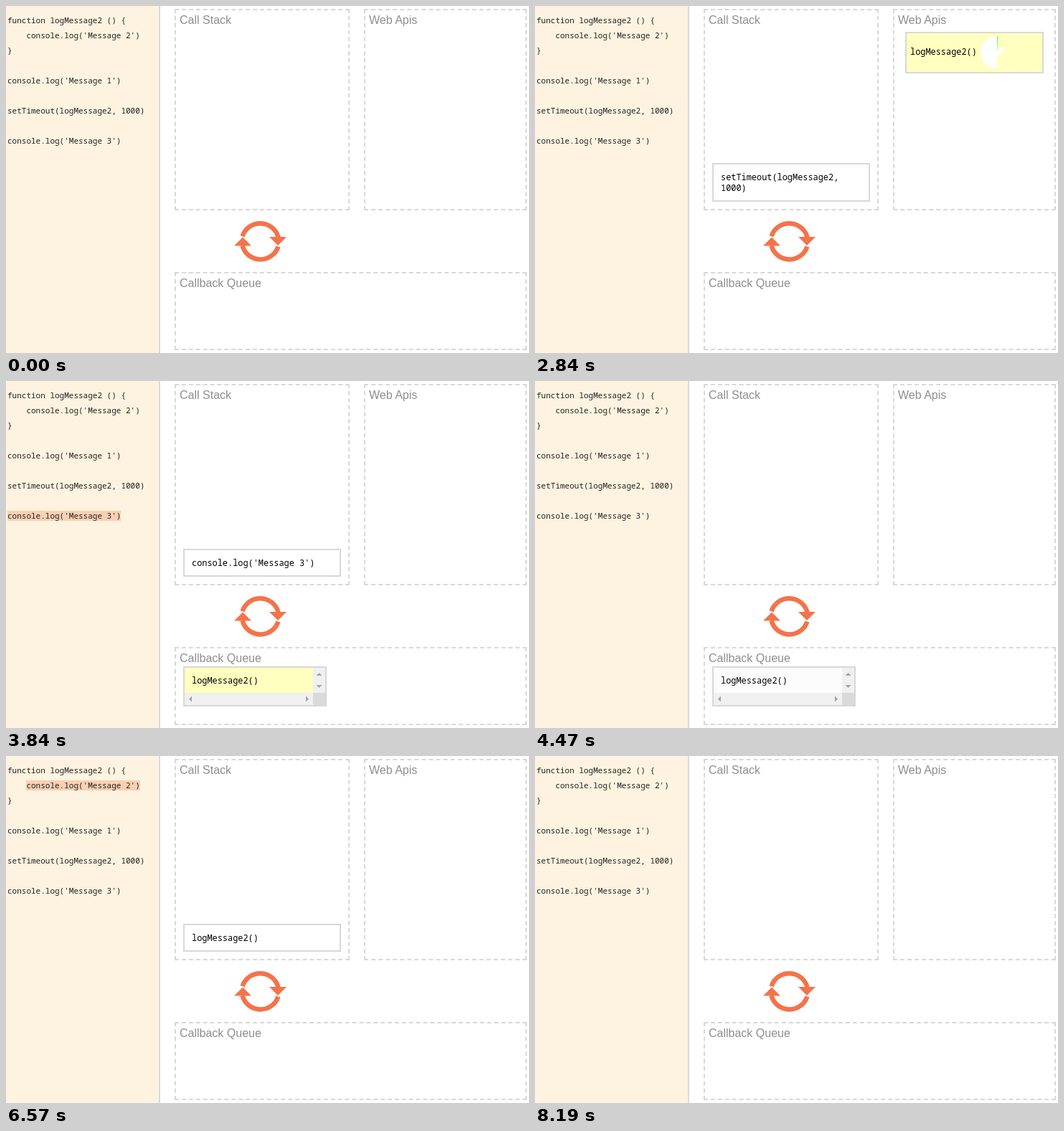
These frames come from a looping animation (729 px wide and 484 px high, 9.51 s). An HTML page:

```html
<!DOCTYPE html>
<html lang="en">
<head>
<meta charset="utf-8">
<title>Event loop</title>
<style>
  html, body { margin: 0; width: 100%; height: 100%; overflow: hidden; background: #fff; }
  .code { position: absolute; left: 0; top: 0; width: 213px; height: 484px; background: #fdf3e0; border-right: 2px solid #dbdbd6; }
  .panel { position: absolute; box-sizing: border-box; border: 2px dashed #d8d8d8; }
  svg { position: absolute; left: 0; top: 0; }
  text { white-space: pre; font-family: "Noto Sans Mono", "Liberation Mono", monospace; }
  .src text { font-size: 11px; fill: #222; }
  .item text { font-size: 11.91px; fill: #000; }
  .label text { font: 16px "Liberation Sans", Arial, sans-serif; fill: #8e8e8e; }
  .mark rect { fill: #f9d0b3; }
  .frame { fill: #fff; stroke: #d8d8d8; stroke-width: 2; }
  .track { fill: #f0f0f0; }
  .arrow { fill: #a2a2a2; }
  .mark rect, .item { opacity: 0; }
</style>
</head>
<body>
<div class="code"></div>
<div class="panel" style="left:235px;top:4px;width:244px;height:281px"></div>
<div class="panel" style="left:499px;top:4px;width:227px;height:281px"></div>
<div class="panel" style="left:235px;top:371px;width:491px;height:109px"></div>

<svg width="729" height="484" viewBox="0 0 729 484">
  <g class="mark">
    <rect id="mark1" x="2" y="97" width="158" height="14"/>
    <rect id="markTimer" x="2" y="139" width="191" height="14"/>
    <rect id="mark3" x="2" y="181" width="158" height="14"/>
    <rect id="mark2" x="28" y="34" width="159" height="14"/>
  </g>
  <g class="src">
    <text x="2" y="24">function logMessage2 () {</text>
    <text x="28.4" y="45">console.log('Message 2')</text>
    <text x="2" y="66">}</text>
    <text x="2" y="108">console.log('Message 1')</text>
    <text x="2" y="150">setTimeout(logMessage2, 1000)</text>
    <text x="2" y="192">console.log('Message 3')</text>
  </g>
  <g class="label">
    <text x="242" y="25">Call Stack</text>
    <text x="506" y="25">Web Apis</text>
    <text x="242" y="392">Callback Queue</text>
  </g>

  <g id="loop" fill="#f4734a">
    <g id="half">
      <path d="M329.6 321.2A26 26 0 0 1 379.5 322.5" fill="none" stroke="#f4734a" stroke-width="6.5"/>
      <path d="M367 322h24l-12 12z"/>
    </g>
    <use href="#half" transform="rotate(180 354.5 328.3)"/>
  </g>

  <g class="item" id="log1">
    <rect class="frame" x="248" y="235" width="218" height="37"/>
    <text x="259" y="258">console.log('Message 1')</text>
  </g>
  <g class="item" id="timeout">
    <rect class="frame" x="248" y="220" width="218" height="52"/>
    <text x="259" y="243">setTimeout(logMessage2,</text>
    <text x="259" y="258">1000)</text>
  </g>
  <g class="item" id="log3">
    <rect class="frame" x="248" y="235" width="218" height="37"/>
    <text x="259" y="258">console.log('Message 3')</text>
  </g>
  <g class="item" id="call2">
    <rect class="frame" x="248" y="235" width="218" height="37"/>
    <text x="259" y="258">logMessage2()</text>
  </g>
  <g class="item" id="log2">
    <rect class="frame" x="248" y="186" width="218" height="37"/>
    <text x="259" y="209">console.log('Message 2')</text>
  </g>

  <g class="item" id="api">
    <rect class="frame" id="apiBox" x="517" y="37" width="191" height="56"/>
    <text x="523" y="68">logMessage2()</text>
    <path fill="#fff" d="M644 42a23 22.5 0 0 0 0 45z"/>
    <path id="flap" fill="#fff" d="M643 73L655 60L651 56L643 64z"/>
    <path id="pie" fill="#90ee90"/>
  </g>

  <g class="item" id="queue">
    <rect class="frame" id="queueBox" x="248" y="399" width="198" height="54"/>
    <text x="259" y="422">logMessage2()</text>
    <rect class="track" x="428" y="400" width="17" height="35"/>
    <rect class="track" x="249" y="435" width="179" height="17"/>
    <rect x="428" y="435" width="17" height="17" fill="#dadada"/>
    <path class="arrow" d="M432.5 411h8l-4-4zM432.5 424h8l-4 4zM259 439.5v8l-4-4zM418 439.5v8l4-4z"/>
  </g>
</svg>

<script>
const LOOP = 9510, TICK = 76;
const $ = id => document.getElementById(id);

// Stepped opacity: [time, value] pairs, each held until the next
const steps = {
  mark1: [[610, 1], [1370, 0]],
  log1: [[690, .5], [760, 1], [1450, 0]],
  markTimer: [[2150, 1], [2840, 0]],
  timeout: [[2230, 1], [2920, 0]],
  api: [[2840, 1], [3840, 0]],
  mark3: [[3610, 1], [4320, 0]],
  log3: [[3690, .5], [3765, 1], [4390, .5], [4470, 0]],
  call2: [[5930, .4], [6010, 1], [8040, .66], [8110, .33], [8190, 0]],
  mark2: [[6570, 1], [7330, 0]],
  log2: [[6640, .5], [6720, 1], [7410, 0]]
};

const hold = (t, keys) => keys.reduce((v, [at, next]) => t >= at ? next : v, 0);

// Progress 0..1 that advances in ticks
const ramp = (t, from, span) =>
  Math.max(0, Math.min(1, Math.floor((t - from) / TICK) * TICK / span));

const flash = p => `rgb(${255 - 3 * p},${255 - 3 * p},${191 + 61 * p})`;

function wedge(p) {
  const a = Math.min(p, .9999) * 2 * Math.PI;
  const x = 644 + 23 * Math.sin(a), y = 64.5 - 22.5 * Math.cos(a);
  return `M644 64.5V42A23 22.5 0 ${p > .5 ? 1 : 0} 1 ${x} ${y}z`;
}

function draw(now) {
  const t = now % LOOP;
  for (const id in steps) $(id).style.opacity = hold(t, steps[id]);

  $('apiBox').style.fill = flash(ramp(t, 2840, 228));
  $('flap').style.opacity = t < 2920 ? 1 : 0;
  $('pie').setAttribute('d', wedge(.014 + .986 * ramp(t, 2840, 988)));

  const leave = ramp(t, 5784, 304);
  $('queue').style.opacity = t < 3840 ? 0 : 1 - leave;
  $('queue').setAttribute('transform', `translate(0 ${-22 * leave})`);
  $('queueBox').style.fill = flash(ramp(t, 3840, 228));

  const turn = ramp(t, 5788, 532);
  const eased = turn * turn * (3 - 2 * turn);
  $('loop').setAttribute('transform', `rotate(${180 * eased} 354.5 328.3)`);
}

let start;
function tick(now) {
  start ??= now;
  draw(now - start);
  requestAnimationFrame(tick);
}
draw(0);
requestAnimationFrame(tick);
</script>
</body>
</html>
```
